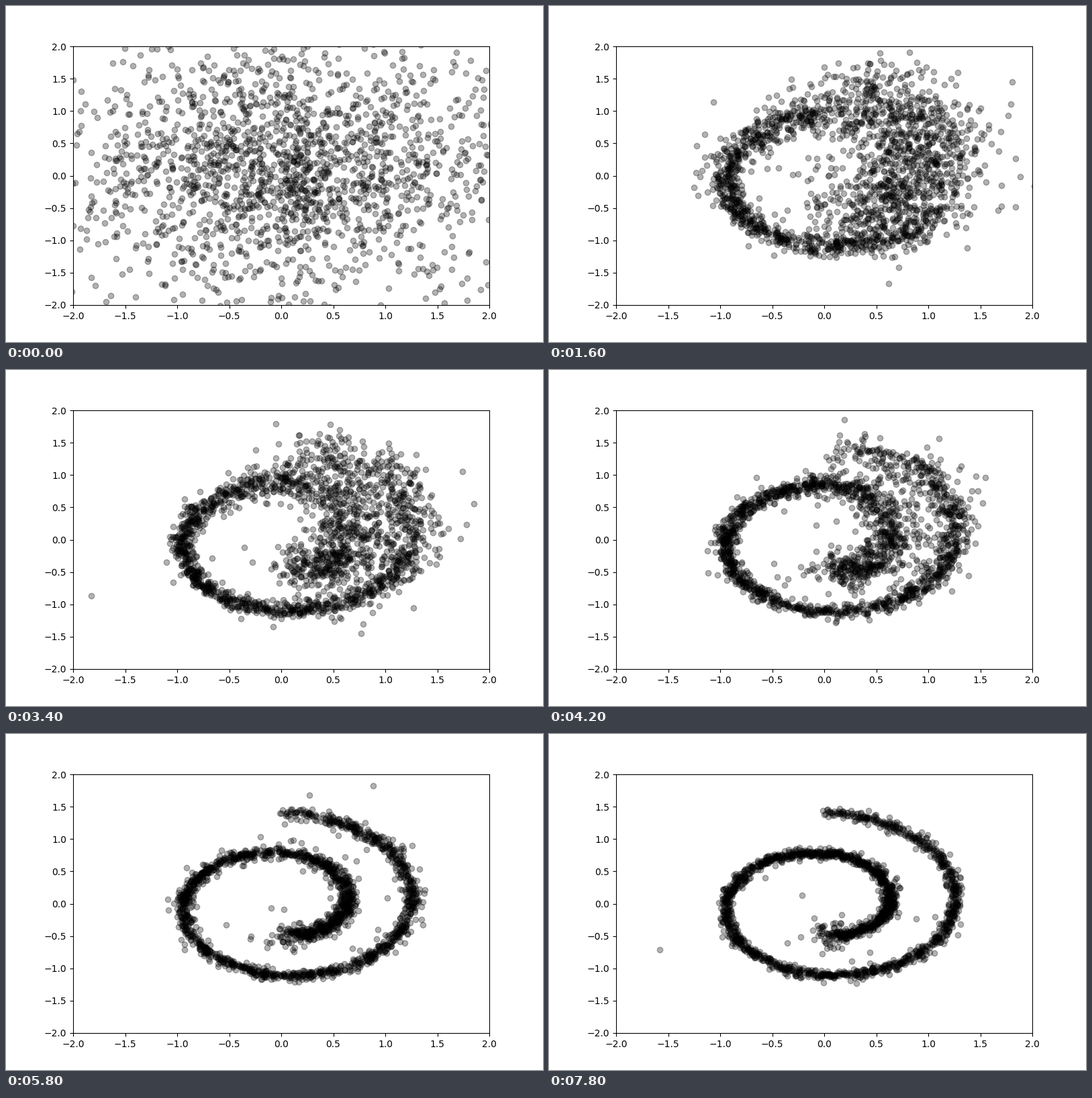
These frames come from a looping animation (800x500 px, 8000 ms). A matplotlib script:

```python
import numpy as np
import matplotlib.pyplot as plt
from matplotlib.animation import FuncAnimation

FRAMES, N = 40, 2000


def bump(turn, center, width):
    return np.exp(-((turn - center) / width) ** 2)


def roll_samples(k, rng):
    """Spiral as learned by step k: the left arc settles first, the ends last."""
    fade = np.exp(-(max(0, k - 8) / 12) ** 2)
    turn = rng.uniform(1.5, 4.5, N)
    angle = turn * np.pi

    # Some points still hang between two neighbouring arms.
    gap = rng.random(N) * 2 * np.pi
    lost = rng.random(N) < 0.6 * fade
    outward = lost & (turn > 1.7) & (turn < 2.5)
    inward = lost & (turn > 3.85) & (rng.random(N) < fade)
    radius = (angle + gap * outward - gap * inward) / 10

    # The half-learned curve bends up at the top and stops short of its ends.
    x = radius * np.cos(angle)
    y = radius * np.sin(angle)
    x += fade * (0.35 * bump(turn, 4.5, 0.3) + 0.2 * bump(turn, 1.5, 0.3))
    y += fade * 0.25 * bump(turn, 2.4, 0.25)

    hard = np.minimum(1, (turn - 3.25) ** 2 / 1.2)
    blur = 0.03 + 0.03 * fade + 0.2 * hard * fade + 0.07 * bump(turn, 1.5, 0.08)
    return np.column_stack([x, y]) + blur[:, None] * rng.standard_t(5, (N, 2))


def samples(k):
    rng = np.random.default_rng(100 + k)
    blob = 0.95 * rng.standard_t(6, (N, 2)) + [-0.05, 0.12]
    points = roll_samples(k, rng)
    stray = rng.integers(5, 10)
    points[:stray] = blob[:stray]
    mix = max(0, 1 - k / 9) ** 2
    return mix * blob + (1 - mix) * points


fig, ax = plt.subplots(figsize=(8, 5), dpi=100)
ax.set_xlim(-2, 2)
ax.set_ylim(-2, 2)
dots = ax.scatter(*samples(0).T, color="black", alpha=0.3, s=36, linewidths=1)


def draw(k):
    dots.set_offsets(samples(k))
    return dots,


anim = FuncAnimation(fig, draw, frames=FRAMES, interval=200, repeat=True)
plt.show()
```
